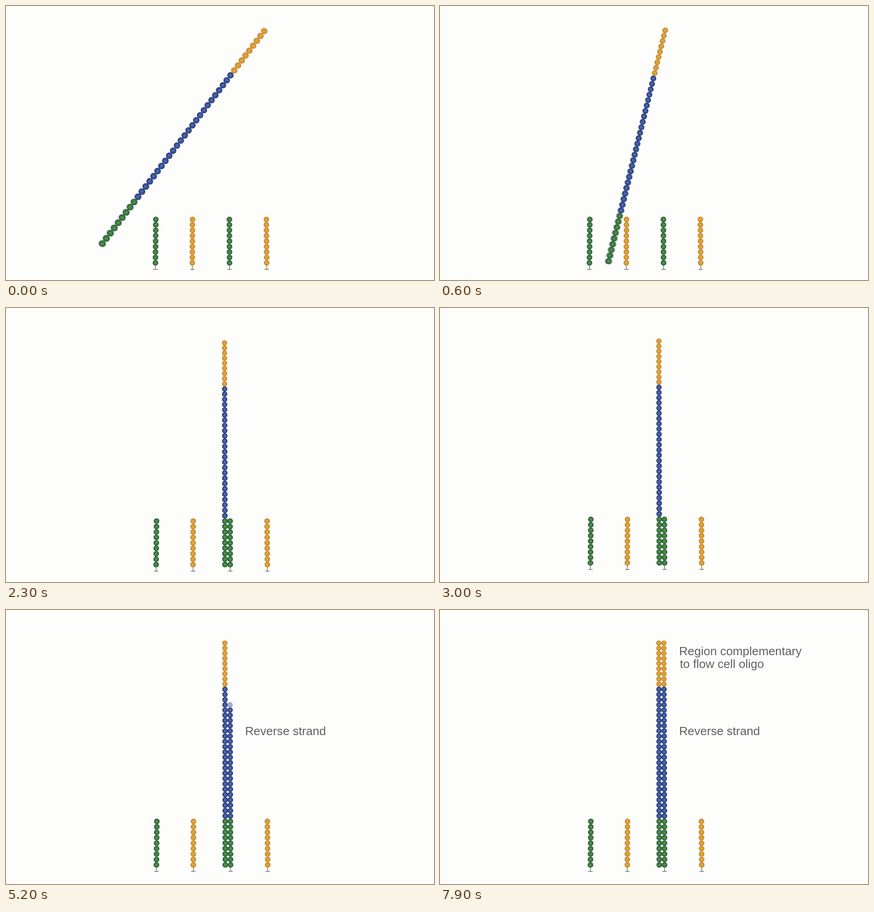
Animation, 934 px wide and 600 px high, one loop 8000 ms. Source, as an HTML page:

```html
<!DOCTYPE html>
<html lang="en">
<head>
<meta charset="utf-8">
<title>Strand copying</title>
<style>
  html, body { margin: 0; width: 100%; height: 100%; overflow: hidden; background: #fdfefc; }
  svg { display: block; width: 934px; height: 600px; }
  text { font: 26px "Liberation Sans", Arial, sans-serif; fill: #5f6063; }
</style>
</head>
<body>
<svg id="stage" viewBox="0 0 934 600">
  <defs></defs>
  <g id="camera"></g>
  <text id="reverse" x="521.8" y="273.6">Reverse strand</text>
  <text id="region" x="521.8" y="98.7">Region complementary<tspan x="523.4" dy="28">to flow cell oligo</tspan></text>
</svg>
<script>
const LOOP = 8000, STEP = 100;
const BEADS = 43, CAPS = 9;
const REST_LENGTH = 485.5;
const palette = {
  green: ["#5a9c4e", "#3f7d41", "#28553a"],
  gold: ["#e6ac36", "#d99d33", "#bd8438"],
  blue: ["#5474b8", "#3d579d", "#222f66"]
};

const byId = id => document.getElementById(id);
const clamp = v => Math.min(1, Math.max(0, v));
const lerp = (a, b, u) => a + (b - a) * u;

function add(parent, tag, attrs) {
  const node = document.createElementNS("http://www.w3.org/2000/svg", tag);
  setAttrs(node, attrs);
  return parent.appendChild(node);
}

function setAttrs(node, attrs) {
  for (const name in attrs) node.setAttribute(name, attrs[name]);
}

// Linear interpolation through [time, value] pairs.
function track(keys, t) {
  const next = keys.findIndex(k => k[0] > t);
  if (next < 0) return keys[keys.length - 1][1];
  if (next === 0) return keys[0][1];
  const [t0, v0] = keys[next - 1], [t1, v1] = keys[next];
  return lerp(v0, v1, (t - t0) / (t1 - t0));
}

const defs = document.querySelector("defs");
for (const name in palette) {
  const gradient = add(defs, "radialGradient", { id: name });
  [0, 0.55, 1].forEach((offset, i) =>
    add(gradient, "stop", { offset, "stop-color": palette[name][i] }));
}

const camera = byId("camera");
const bead = (parent, color, cx = 0, cy = 0, r = 6) =>
  add(parent, "circle", { cx, cy, r, fill: `url(#${color})` });

// Perspective: beads spread and grow slightly toward the bottom.
const along = i => (11.15 * i + 0.0098 * i * i) / REST_LENGTH;
const radius = i => lerp(5.75, 6.25, along(i));
const colorAt = i => i < CAPS ? "gold" : i < BEADS - CAPS ? "blue" : "green";

function makeStand(topX, bottomX, color) {
  add(camera, "path", {
    d: `M${bottomX} 567V576.8M${bottomX - 4.8} 576.8h9.6`,
    stroke: "#6c6c6c", "stroke-width": 1.4, fill: "none"
  });
  for (let i = 0; i < CAPS; i++)
    bead(camera, color, lerp(topX, bottomX, i / 8), 467.3 + 11.9 * i, 6.15);
}

function makeStrand(opacity) {
  const group = add(camera, "g", { opacity });
  return Array.from({ length: BEADS }, (_, i) => bead(group, colorAt(i)));
}

const blurLayers = [[-9, makeStrand(0.38)], [9, makeStrand(0.38)]];
const strand = makeStrand(1);

makeStand(327, 326.1, "green");
makeStand(407, 406.6, "gold");
makeStand(487.5, 487.8, "green");
makeStand(568.2, 568.9, "gold");

const copy = Array.from({ length: BEADS - CAPS }, (_, k) => {
  const i = BEADS - CAPS - 1 - k, u = along(i);
  return bead(camera, colorAt(i), lerp(486.4, 487.8, u), 76.8 + REST_LENGTH * u, radius(i));
});

// The strand swings upright while its foot travels to the third stand.
function pose(t) {
  const ease = (speed, end) => Math.sin(speed * Math.max(0, end - t)) ** 2;
  const tilt = ease(0.000724, 1284) / 0.6426;
  const length = REST_LENGTH + 99 * tilt;
  const dx = -1 + 354.5 * tilt;
  const dy = Math.sqrt(length * length - dx * dx);
  const footX = 476.4 - 314 * ease(0.000902, 1297);
  const footY = 562.3 - 49.4 * tilt * tilt + 7.4 * tilt;
  return { x: footX + dx, y: footY - dy, dx, dy, scale: length / REST_LENGTH };
}

function placeStrand(beads, t, visible = true) {
  const p = pose(t);
  beads.forEach((node, i) => {
    const u = along(i);
    setAttrs(node, {
      cx: p.x - p.dx * u,
      cy: p.y + p.dy * u,
      r: visible ? radius(i) * lerp(1, p.scale, 0.7) : 0
    });
  });
}

const panX = [[1000, 0], [1500, 1], [1900, 1], [2000, 1.3], [2200, 1.3], [2300, 1.5],
  [2500, 1.8], [2700, 1.8], [3000, 2.2]];
const panY = [[1900, 0], [2000, -0.2], [2200, -0.2], [2300, -0.6], [2500, -2.5],
  [2700, -2.5], [3000, -4.3]];

function render(t) {
  camera.setAttribute("transform", `translate(${track(panX, t)} ${track(panY, t)})`);
  placeStrand(strand, t);
  for (const [shift, beads] of blurLayers) placeStrand(beads, t + shift, t < 1300);
  copy.forEach((node, k) =>
    node.setAttribute("opacity", clamp((t - 3950 - 57 * k) / 110)));
  byId("reverse").setAttribute("opacity", clamp((t - 4000) / 600));
  byId("region").setAttribute("opacity", clamp((t - 5300) / 600));
}

const start = performance.now();
function tick() {
  const t = (performance.now() - start) % LOOP;
  render(Math.floor(t / STEP) * STEP);
  requestAnimationFrame(tick);
}
tick();
</script>
</body>
</html>
```
